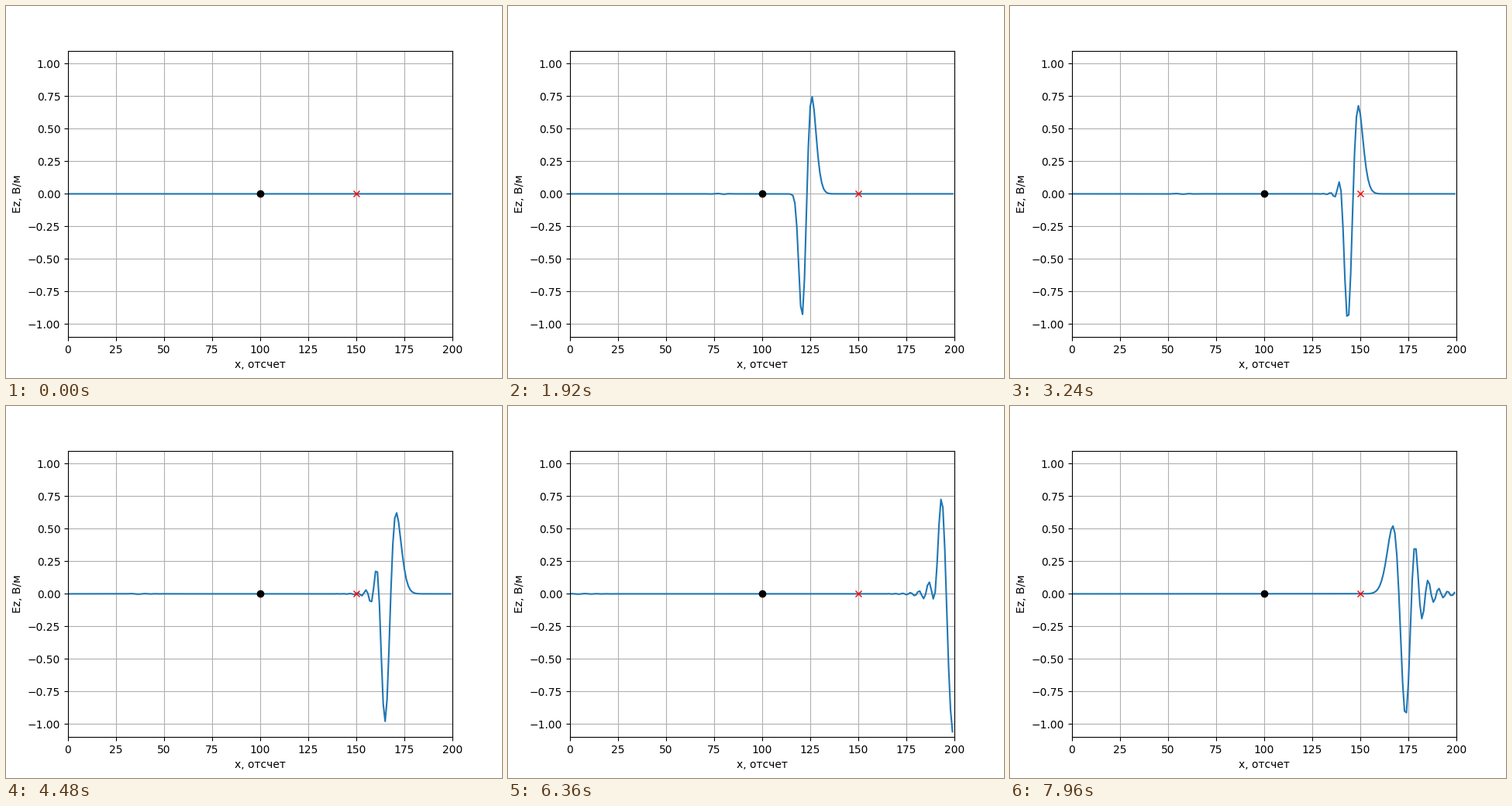
Write a matplotlib script that moves like this. It is 640 px wide and 480 px high and loops after 8000 ms.

```python
import numpy as np
import matplotlib.pyplot as plt
from matplotlib.animation import FuncAnimation

# 1D FDTD run: a differentiated Gaussian pulse in a dielectric,
# absorbing border on the left, magnetic wall on the right.
SIZE = 200
SOURCE, PROBE = 100, 150
EPS = 8.0
S = 1 / np.sqrt(EPS)          # effective Courant number
DELAY, WIDTH = 30.0, 10.0     # pulse timing in steps
STEPS_PER_FRAME = 2
FRAMES, INTERVAL = 200, 40


def pulse(m, q):
    """Incident field at offset m (cells) and time q (steps)."""
    u = (q - m / S - DELAY) / WIDTH
    return -2 * u * np.exp(-u * u)


def simulate():
    ez = np.zeros(SIZE)
    hy = np.zeros(SIZE)       # scaled by the wave impedance; hy[-1] stays 0
    border = (S - 1) / (S + 1)
    shots = []
    for q in range(FRAMES * STEPS_PER_FRAME):
        hy[:-1] += S * np.diff(ez)
        hy[SOURCE - 1] -= S * pulse(0, q)

        old0, old1 = ez[0], ez[1]
        ez[1:] += S * np.diff(hy)
        ez[SOURCE] += S * pulse(-0.5, q + 0.5)
        ez[0] = old1 + border * (ez[1] - old0)

        if q % STEPS_PER_FRAME == 0:
            shots.append(ez.copy())
    return shots


fields = simulate()

fig, ax = plt.subplots(figsize=(6.4, 4.8), dpi=100)
ax.set_xlim(0, SIZE)
ax.set_ylim(-1.1, 1.1)
ax.set_xlabel("x, отсчет")
ax.set_ylabel("Ez, В/м")
ax.grid()

line, = ax.plot(np.arange(SIZE), fields[0])
ax.plot(PROBE, 0, "xr")
ax.plot(SOURCE, 0, "ok")


def update(i):
    line.set_ydata(fields[i])
    return line,


def reset():
    return update(0)


anim = FuncAnimation(fig, update, frames=FRAMES, init_func=reset,
                     interval=INTERVAL, repeat=True, repeat_delay=0)
plt.show()
```
